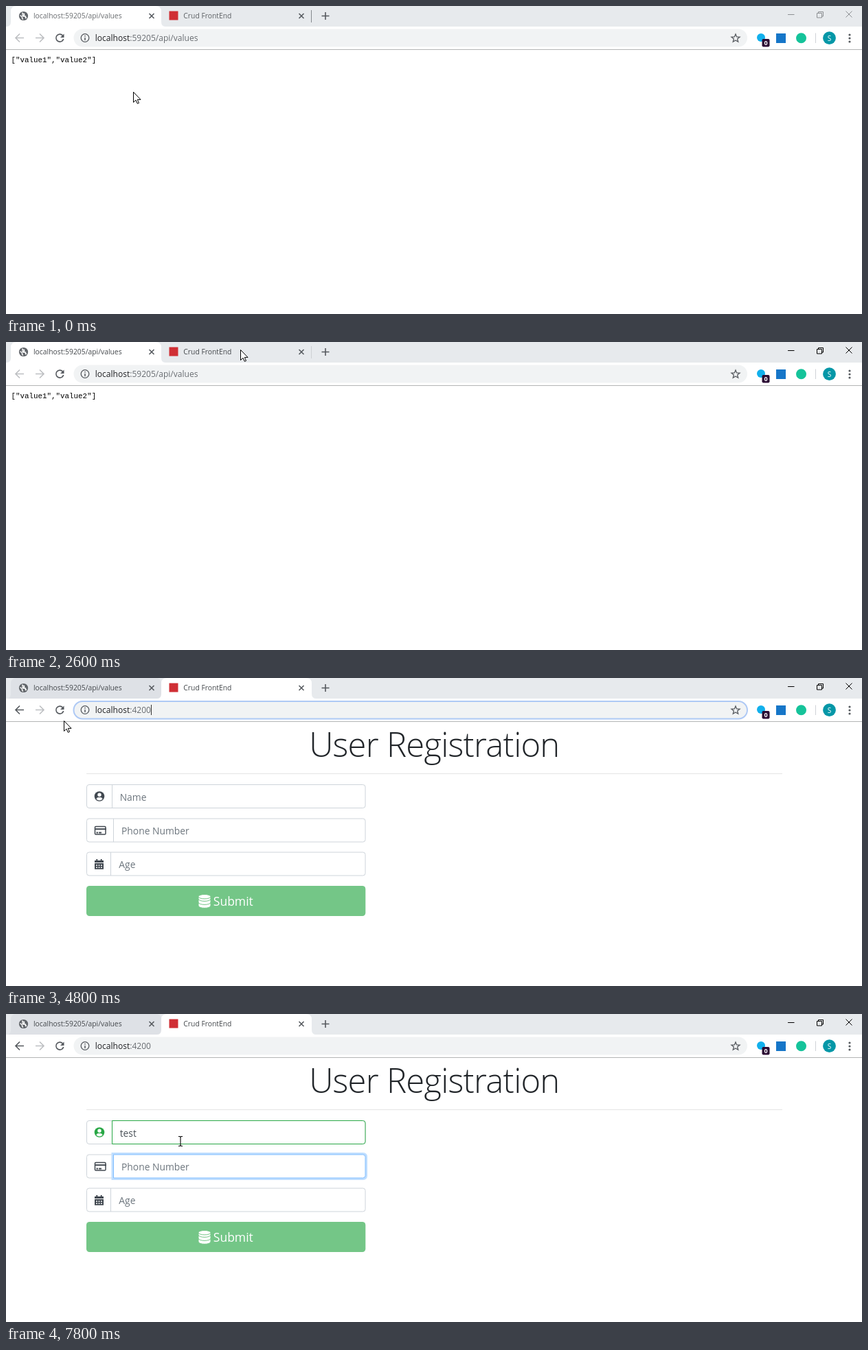
These frames come from a looping animation (1246 px wide and 449 px high, 8 s). An HTML page:

```html
<!DOCTYPE html>
<html lang="en">
<head>
<meta charset="utf-8">
<title>User Registration</title>
<style>
  html, body { margin: 0; width: 100%; height: 100%; overflow: hidden; background: #fff; }
  svg { display: block; width: 1246px; height: 449px; }
  text { font-family: "Open Sans", "Noto Sans", sans-serif; white-space: pre; }
  .tab-title { font-size: 10.35px; fill: #45494d; }
  .url { font-size: 12.05px; fill: #202124; }
  .dim { fill: #696d72; }
  .json { font: 10.85px "Liberation Mono", "DejaVu Sans Mono", monospace; fill: #000; }
  .heading { font-size: 49px; font-weight: 300; letter-spacing: -.8px; fill: #212529; text-anchor: middle; }
  .field { font-size: 13.85px; fill: #6c757d; }
  .submit { font-size: 17.5px; fill: #fff; }
  .line { fill: none; stroke: #55595e; stroke-width: 1.6; }
  .box { fill: #fff; stroke: #ced4da; }
  .caret { stroke: #333; stroke-width: 1; }
</style>
</head>
<body>
<svg viewBox="0 0 1246 449">
  <defs>
    <path id="tab" d="M-6 30Q0 30 0 23V8Q0 0 8 0H211Q219 0 219 8V23Q219 30 225 30Z"/>
    <path id="cross" class="line" d="M-3.5-3.5L3.5 3.5M3.5-3.5L-3.5 3.5"/>
    <path id="arrow" class="line" d="M6 0H-5.5M0-6L-6 0L0 6" style="stroke:inherit"/>
  </defs>

  <!-- tab strip -->
  <rect width="1246" height="30" fill="#e7eaed"/>
  <use id="tab1" href="#tab" x="7"/>
  <use id="tab2" href="#tab" x="226" fill="#fff"/>
  <circle cx="25.5" cy="14.5" r="6.6" fill="#5f6368"/>
  <path d="M20.5 13.5L23.5 16V18L25 19.5M24 9.5V11.5H26.5V13.5H24L25 15H28.5V17.5L30 17" fill="none" stroke="#fff" stroke-width="1.4"/>
  <text id="title1" class="tab-title" x="40" y="18">localhost:59205/api/values</text>
  <use href="#cross" x="212" y="14.5"/>
  <rect x="237.5" y="7.5" width="13" height="13" fill="#d02f35"/>
  <text id="title2" class="tab-title" x="258.3" y="18">Crud FrontEnd</text>
  <use href="#cross" x="430" y="14.5"/>
  <path id="divider" d="M444.5 6V24" stroke="#85898e"/>
  <path class="line" d="M459.5 14.5H470.5M465 9V20"/>
  <g id="caption" fill="none">
    <path d="M1138 12.5H1147.5M1180.5 10.5h7v6.5h-7zM1182.5 10.5V8.5H1189.5V15H1187.5M1222.5 7.5L1231.5 16.5M1231.5 7.5L1222.5 16.5"/>
  </g>

  <!-- toolbar -->
  <use id="back" href="#arrow" x="20" y="46.5"/>
  <use href="#arrow" transform="translate(49 46.5) scale(-1 1)" stroke="#bdbfc2"/>
  <path class="line" d="M82.5 43A5.5 5.5 0 1 0 83.7 48"/>
  <path d="M84.5 40.5V46H79Z" fill="#55595e"/>
  <rect x="98.5" y="33.5" width="980.5" height="26" rx="13" fill="#f1f3f4"/>
  <rect id="ring" x="98.5" y="34" width="980.5" height="25.5" rx="12.8" fill="none" stroke="#aec9f5" stroke-width="2"/>
  <circle class="line" cx="115" cy="46.5" r="5.8" style="stroke-width:1.3"/>
  <path d="M115 43V44.6M115 46V50" stroke="#55595e" stroke-width="1.5"/>
  <text class="url" x="129.7" y="51">localhost<tspan class="dim" id="path"></tspan></text>
  <path id="urlCaret" class="caret" d="M0 39V54"/>
  <path d="M1062 41L1063.6 45L1068 45.3L1064.6 48L1065.7 52.2L1062 49.9L1058.3 52.2L1059.4 48L1056 45.3L1060.4 45Z" fill="none" stroke="#55595e" stroke-width="1.3"/>
  <circle cx="1099" cy="46" r="6" fill="#12b0ec"/>
  <rect x="1100.5" y="48" width="11" height="11.5" rx="2" fill="#2b0b33"/>
  <text x="1106" y="57.3" font-size="9" font-weight="700" fill="#fff" text-anchor="middle">0</text>
  <rect x="1121" y="40" width="14" height="14" fill="#1676c8"/>
  <circle cx="1157.5" cy="46.7" r="7.5" fill="#15c39a"/>
  <path d="M1178.5 39.5V54" stroke="#cfd2d6"/>
  <circle cx="1198.5" cy="46.7" r="9.4" fill="#0497a7"/>
  <text x="1198.5" y="50.5" font-size="10" fill="#fff" text-anchor="middle">S</text>
  <g fill="#55595e">
    <circle cx="1228" cy="42" r="1.6"/><circle cx="1228" cy="47" r="1.6"/><circle cx="1228" cy="52" r="1.6"/>
  </g>
  <path d="M0 63.5H1246" stroke="#b3b5b4"/>

  <text id="json" class="json" x="7.5" y="82">["value1","value2"]</text>

  <!-- registration form -->
  <g id="form">
    <text class="heading" x="623.3" y="115">User Registration</text>
    <path d="M117 139.5H1130" stroke="#e5e5e5"/>
    <g id="groups"></g>
    <path id="glow" fill="none" stroke="#bfdeff" stroke-width="6"/>
    <path id="nameBox"/>
    <path id="phoneBox"/>
    <g id="userIcon">
      <circle cx="136" cy="172.5" r="7.3"/>
      <circle cx="136" cy="170.3" r="2.7" fill="#fff"/>
      <path d="M131.4 176.5Q132.2 174 134 174H138Q139.8 174 140.6 176.5Q138.5 178.4 136 178.4T131.4 176.5Z" fill="#fff"/>
    </g>
    <rect x="129.5" y="216.5" width="15.5" height="11.5" rx="1.3" fill="none" stroke="#414850" stroke-width="1.5"/>
    <path d="M129 220.3H146M131.5 225.5H134M135 225.5H139" stroke="#414850" stroke-width="2"/>
    <g fill="#414850">
      <path d="M131.3 264H133.3V266H137.7V264H139.7V266H142V269H129V266H131.3ZM129 270H142V278.7H129Z"/>
      <path d="M131 273H140M131 276.3H140" stroke="#fff" stroke-width="1.6" stroke-dasharray="2 1.5"/>
    </g>
    <text id="nameText" class="field" x="165.7" y="178.7"></text>
    <text class="field" x="168" y="228">Phone Number</text>
    <text class="field" x="164.3" y="277.3">Age</text>
    <path id="nameCaret" class="caret" d="M0 164V183"/>
    <path id="phoneCaret" class="caret" d="M168.5 213V232"/>
    <rect x="117" y="303" width="406.3" height="44" rx="4.5" fill="#74c687"/>
    <g fill="#fff" stroke="#74c687">
      <path d="M280 328V332A9 3.4 0 0 0 298 332V328Z"/>
      <path d="M280 323V327A9 3.4 0 0 0 298 327V323Z"/>
      <path d="M280 318V322A9 3.4 0 0 0 298 322V318Z"/>
      <ellipse cx="289" cy="318.7" rx="9" ry="3.2"/>
    </g>
    <text class="submit" x="301.8" y="332">Submit</text>
  </g>

  <g id="pointer">
    <path id="hand" d="M.5 .5V15.5L4 12.2L6.3 17.3L8.5 16.4L6.3 11.4H11Z" fill="#fff" stroke="#000"/>
    <path id="beam" d="M-3-6.5H-1L0-5.5L1-6.5H3M0-5.5V6.5M-3 7.5H-1L0 6.5L1 7.5H3" fill="none" stroke="#000" stroke-width="1.1"/>
  </g>
</svg>

<script>
const LOOP = 8000;
const GREEN = '#28a745', BLUE = '#80bdff', INK = '#414850';
const $ = id => document.getElementById(id);
const set = (id, attrs) => {
  for (const key in attrs) $(id).setAttribute(key, attrs[key]);
};
const show = (id, on) => { $(id).style.visibility = on ? 'inherit' : 'hidden'; };
const between = (t, from, to) => t >= from && t < to;
const last = (rows, t) => rows.filter(row => row[0] <= t).pop();

// time, x, y, text cursor
const moves = [
  [0, 185, 125], [200, 186, 132], [400, 220, 106], [600, 268, 72],
  [800, 305, 50, 1], [1200, 272, 52, 1],
  [1400, 290, 70], [1600, 322, 128], [1800, 340, 172], [2000, 340, 184],
  [2200, 341, 120], [2400, 341, 44], [2600, 341, 11],
  [3200, 321, 31], [3400, 430, 110], [3600, 556, 161], [3800, 370, 130],
  [4000, 188, 90], [4200, 262, 39, 1], [4400, 240, 46, 1], [4600, 150, 47, 1],
  [4800, 84, 62], [5000, 165, 102], [5200, 222, 132], [5400, 258, 152],
  [5600, 275, 172, 1], [5800, 268, 176, 1], [6000, 258, 182, 1], [6200, 254, 185, 1]
];
const typed = [[0, ''], [6800, 't'], [7000, 'tes'], [7200, 'test']];

const fieldPath = (x, y) => `M${x} ${y}H519.5Q523 ${y} 523 ${y + 3.5}V${y + 30.5}Q523 ${y + 34} 519.5 ${y + 34}H${x}Z`;
const nameShape = fieldPath(154.5, 155.5);
const phoneShape = fieldPath(156.5, 205);

$('groups').innerHTML = [[155.5, 154.5], [205, 156.5], [254, 152.5]].map(([y, x]) =>
  `<rect class="box" x="117.5" y="${y}" width="405.5" height="34" rx="3.5"/>
   <path class="box" d="M${x} ${y}v34"/>`).join('');
set('nameBox', { d: nameShape, fill: '#fff' });
set('phoneBox', { d: phoneShape, fill: '#fff', stroke: BLUE });

function drawBrowser(t) {
  const second = t >= 2800;
  const active = t >= 800;
  const focus = between(t, 800, 1800) || between(t, 4400, 5000);
  set('tab1', { fill: second ? '#dee1e6' : '#fff' });
  show('tab2', second);
  show('divider', !second);
  set('divider', { opacity: t < 2600 ? 1 : .25 });
  set('title1', { opacity: active ? 1 : .8 });
  set('title2', { opacity: active ? 1 : .85 });
  set('caption', { stroke: active ? '#000' : '#8c8f92' });
  set('back', { stroke: second ? '#55595e' : '#bdbfc2' });
  $('path').textContent = second ? ':4200' : ':59205/api/values';
  show('ring', focus);
  show('urlCaret', focus);
  set('urlCaret', { transform: `translate(${second ? 211.5 : 281})` });
  show('json', !second);
  show('form', second);
}

function drawForm(t) {
  const name = between(t, 5800, 7400);
  const phone = t >= 7400;
  const value = last(typed, t)[1];
  const label = $('nameText');
  label.textContent = value || 'Name';
  label.style.fill = value ? '#495057' : '';
  set('userIcon', { fill: value ? GREEN : INK });
  show('glow', name || phone);
  set('glow', { d: phone ? phoneShape : nameShape });
  show('nameBox', name || phone);
  set('nameBox', { stroke: phone ? GREEN : BLUE });
  show('phoneBox', phone);
  show('nameCaret', between(t, 5800, 6200) || between(t, 6800, 7400));
  const width = value ? label.getComputedTextLength() : 0;
  set('nameCaret', { transform: `translate(${Math.round(166 + width) + .5})` });
  show('phoneCaret', between(t, 7400, 7800));
}

function drawPointer(t) {
  const [, x, y, text] = last(moves, t);
  set('pointer', { transform: `translate(${x} ${y})` });
  show('hand', !text);
  show('beam', text);
}

function draw() {
  const t = performance.now() % LOOP;
  drawBrowser(t);
  drawForm(t);
  drawPointer(t);
  requestAnimationFrame(draw);
}
draw();
</script>
</body>
</html>
```
